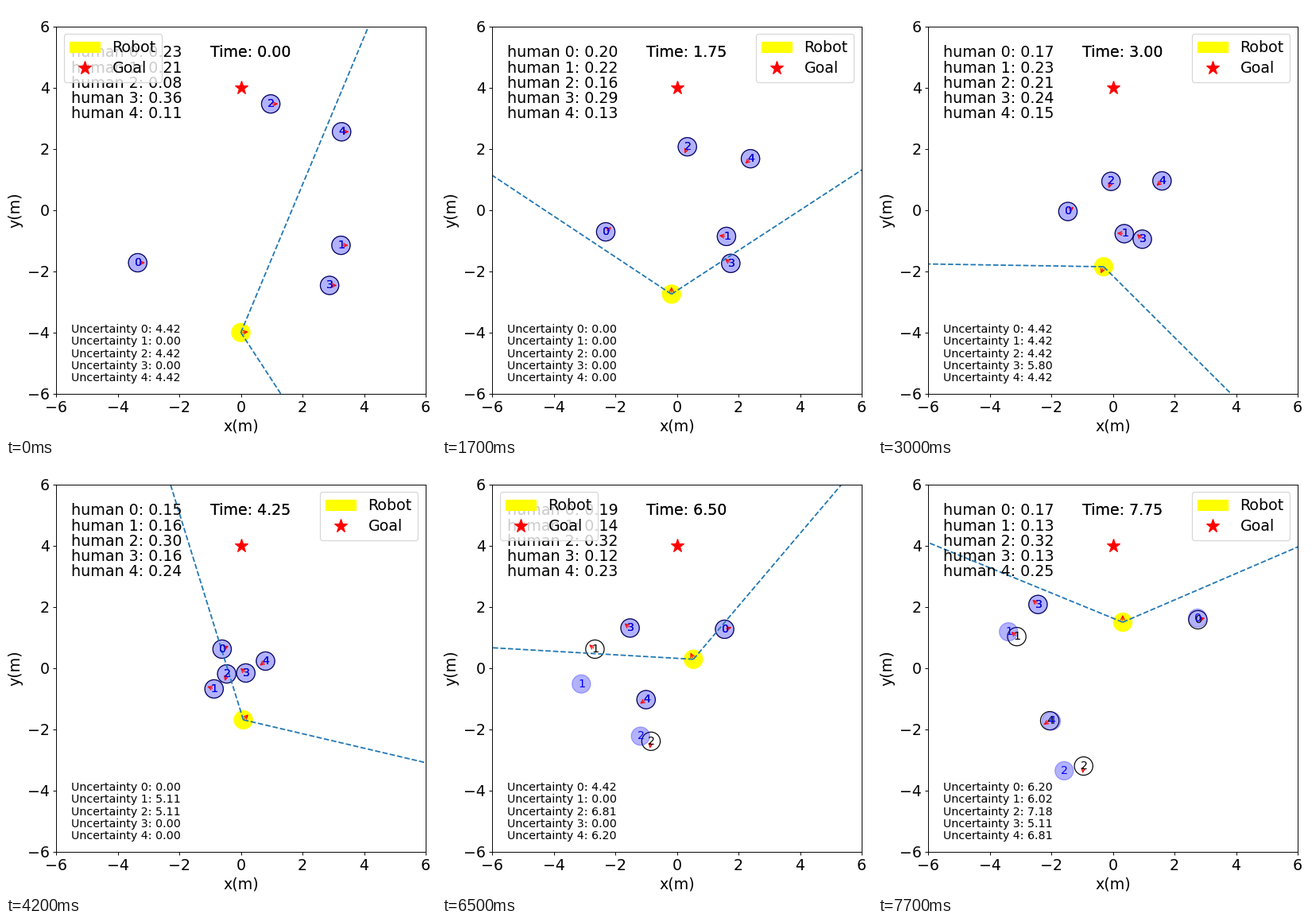
A matplotlib script that plays this animation: 541x541 px, repeating every 8000 ms.

```python
import numpy as np
import matplotlib.pyplot as plt
from matplotlib.animation import FuncAnimation
from matplotlib.lines import Line2D
from matplotlib.patches import ArrowStyle, Circle, FancyArrowPatch

SIZE, DPI = 541, 85.7
STEPS, TICKS = 32, 80
RADIUS = 0.3                # of every disc, in metres
VISION = np.radians(62.4)   # half of the robot's field of view
REACH = 7                   # how far the robot sees

# Places are complex numbers x + yj in metres
WALK_STEPS = [0, 7, 17, 26, 31]
WALKS = [
    [-3.35 - 1.72j, -2.31 - 0.71j, -0.61 + 0.62j, 1.55 + 1.27j, 2.76 + 1.58j],
    [3.25 - 1.15j, 1.61 - 0.86j, -0.87 - 0.68j, -2.66 + 0.62j, -3.12 + 1.03j],
    [0.97 + 3.47j, 0.34 + 2.07j, -0.46 - 0.19j, -0.84 - 2.39j, -0.95 - 3.20j],
    [2.88 - 2.46j, 1.75 - 1.74j, 0.16 - 0.16j, -1.52 + 1.31j, -2.43 + 2.08j],
    [3.27 + 2.56j, 2.39 + 1.68j, 0.80 + 0.23j, -1.00 - 1.03j, -2.05 - 1.72j],
]
ROUTE_STEPS = [0, 12, 17, 22, 31]
ROUTE = [-4j, -0.30 - 1.85j, 0.08 - 1.69j, 0.71 - 0.68j, 0.32 + 1.50j]
WEIGHTS = [
    [.23, .17, .15, .21, .17],
    [.21, .23, .16, .14, .13],
    [.08, .21, .30, .32, .32],
    [.36, .24, .16, .12, .13],
    [.11, .15, .24, .21, .25],
]
# Step, robot heading and half angle between the drawn rays, in degrees
TURNS = np.array([
    (0, 5.2, 62.3), (7, 89.8, 56.5), (11, 115, 60), (12, 247, 67.9),
    (16, 36, 60), (17, 46.9, 60.2), (22, 91, 61.5), (26, 113.3, 63.4),
    (31, 90.5, 67.1),
])


def ease_in(k, steps, values):
    """Each stretch between two keys starts slowly and ends fast."""
    i = min(np.searchsorted(steps, k, "right"), len(steps) - 1)
    u = (k - steps[i - 1]) / (steps[i] - steps[i - 1])
    return values[i - 1] + (values[i] - values[i - 1]) * u**3


steps = np.arange(STEPS)
tracks = np.array([np.interp(steps, WALK_STEPS, w) for w in WALKS])
speeds = np.gradient(tracks, axis=1)
human_turns = np.angle(speeds)
human_turns[:, 0] = 0
weights = np.array([np.interp(steps, ROUTE_STEPS, w) for w in WEIGHTS])
route = np.interp(steps, ROUTE_STEPS, ROUTE)
headings, spreads = np.radians(
    [ease_in(k, TURNS[:, 0], TURNS[:, 1:]) for k in steps]).T

sight = tracks - route
off_axis = np.abs(np.angle(sight * np.exp(-1j * headings)))
seen = (off_axis < VISION) & (np.abs(sight) < REACH)


def last_seen(i, k):
    """Latest step up to k at which human i was in view, or -1."""
    return max((j for j in range(k + 1) if seen[i, j]), default=-1)


def guess(i, k):
    """Straight run on from the latest earlier sighting."""
    j = last_seen(i, k - 1)
    return tracks[i, k] if j < 0 else tracks[i, j] + (k - j) * speeds[i, j]


def uncertainty(i, k):
    return np.log(82 * (k - last_seen(i, k)) + 1)


def xy(z):
    return z.real, z.imag


plt.rcParams.update({"font.family": "DejaVu Sans", "font.size": 16})
side = SIZE / DPI + 1e-9
fig = plt.figure(figsize=(side, side), dpi=DPI, facecolor="white")
ax = fig.add_axes([63 / SIZE, 53.2 / SIZE, 465 / SIZE, 462 / SIZE])
ax.set(xlim=(-6, 6), ylim=(-6, 6), xlabel="x(m)", ylabel="y(m)")
ax.set_xticks(range(-6, 7, 2))
ax.set_yticks(range(-6, 7, 2))


def disc(**style):
    return ax.add_patch(Circle((0, 0), RADIUS, **style))


def arrow():
    style = ArrowStyle("->", head_length=4, head_width=2)
    return ax.add_patch(FancyArrowPatch((0, 0), (1, 0), color="red",
                                        arrowstyle=style))


def label(i, color):
    return ax.text(0, 0, str(i), color=color, fontsize=12, clip_on=True)


humans = range(len(WALKS))
robot = disc(color="yellow")
goal = ax.add_line(Line2D([0], [4], color="red", marker="*", ls="None",
                          markersize=15))
true_discs = [disc(fill=False, ec="black", lw=1) for _ in humans]
guess_discs = [disc(color="b", alpha=0.3, lw=1) for _ in humans]
true_labels = [label(i, "black") for i in humans]
guess_labels = [label(i, "b") for i in humans]
robot_arrow = arrow()
arrows = [arrow() for _ in humans]
rays = [ax.plot([], [], "--", color="#1f77b4", lw=1.5)[0] for _ in range(2)]

# The clock is printed twice, which darkens it
clocks = [ax.text(-1, 5, "") for _ in range(2)]
weight_texts = [ax.text(-5.5, 5 - 0.5 * i, "") for i in humans]
doubt_texts = [ax.text(-5.5, -4 - 0.4 * i, "", fontsize=12) for i in humans]
legend = ax.legend([robot, goal], ["Robot", "Goal"], loc="upper right",
                   fontsize=16, numpoints=1, labelspacing=0.38)


def place(circle, text, spot):
    circle.center = xy(spot)
    text.set_position(xy(spot - 0.1 - 0.1j))


def aim(patch, spot, angle):
    patch.set_positions(xy(spot), xy(spot + RADIUS * np.exp(1j * angle)))


def hits_legend(spot, angle):
    """Whether a ray runs through the upper right corner."""
    x, y = xy(spot + np.linspace(0, 14, 300) * np.exp(1j * angle))
    return np.any((x > 2.55) & (x < 5.77) & (y > 4.2) & (y < 5.75))


def draw(tick):
    k = (2 * tick + 1) // 5

    spot, heading = route[k], headings[k]
    edges = heading + spreads[k], heading - spreads[k]
    robot.center = xy(spot)
    aim(robot_arrow, spot, heading)
    for ray, angle in zip(rays, edges):
        ray.set_data(*xy(np.array([spot, spot + 20 * np.exp(1j * angle)])))
    blocked = any(hits_legend(spot, angle) for angle in edges)
    legend.set_loc("upper left" if blocked else "upper right")

    for i in humans:
        place(true_discs[i], true_labels[i], tracks[i, k])
        place(guess_discs[i], guess_labels[i], guess(i, k))
        aim(arrows[i], tracks[i, k], human_turns[i, k])
        weight_texts[i].set_text(f"human {i}: {weights[i, k]:.2f}")
        doubt_texts[i].set_text(f"Uncertainty {i}: {uncertainty(i, k):.2f}")
    for clock in clocks:
        clock.set_text(f"Time: {k / 4:.2f}")
    return []


anim = FuncAnimation(fig, draw, frames=TICKS, interval=100, repeat=True,
                     repeat_delay=0, blit=False)
plt.show()
```
